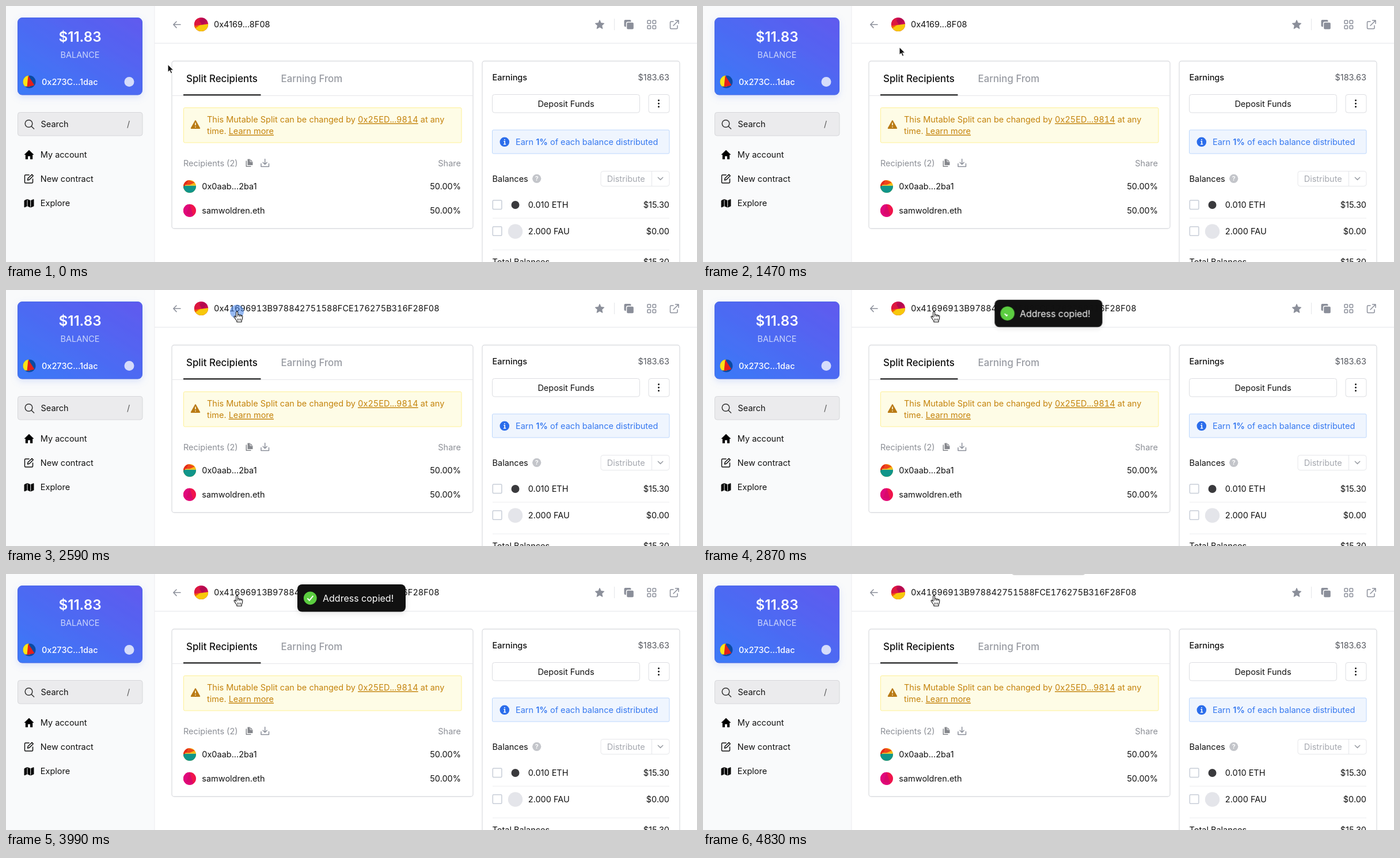
Write an HTML page that moves like this. It is 1200 px wide and 444 px high and loops after 4.9 s.

```html
<!DOCTYPE html>
<html lang="en">
<head>
<meta charset="utf-8">
<title>Split overview</title>
<style>
  :root { --t: 0ms; }
  html, body { margin: 0; width: 100%; height: 100%; overflow: hidden; background: #fff; }
  svg { display: block; width: 100%; height: 100%; }
  text { font: 400 14.5px Inter, Roboto, sans-serif; fill: #111; }
  .mid { text-anchor: middle; }
  .end { text-anchor: end; }
  .medium { font-weight: 500; }
  .bold { font-weight: 600; }
  .white { fill: #fff; }
  .muted { fill: #8c8f96; }
  .tab { font-size: 16.85px; font-weight: 500; }
  .amber { fill: #c4830c; }
  .blue { fill: #3578f0; }
  .hash { font-variant-numeric: tabular-nums; }
  .link { text-decoration: underline; text-underline-offset: 2px; }
  .box { fill: #fff; stroke: #dcdde1; }
  .rule { stroke: #e5e6ea; }
  .line { fill: none; stroke-width: 1.5; stroke-linecap: round; stroke-linejoin: round; }
  .icon { fill: #8b8f9a; }
  .icon-line { stroke: #8b8f9a; }

  /* Each animation is paused and scrubbed by the clock in --t. */
  .cursor {
    transform: translate(281px, 101px);
    animation: approach 560ms ease-in-out calc(1190ms - var(--t)) both paused,
               settle 140ms ease-out calc(2100ms - var(--t)) forwards paused;
  }
  .idle { animation: hide 1ms step-end calc(1650ms - var(--t)) both paused; }
  .hover { animation: show 1ms step-end calc(1650ms - var(--t)) both paused; }
  .press {
    animation: show 1ms step-end calc(2500ms - var(--t)) both paused,
               hide 1ms step-end calc(2640ms - var(--t)) forwards paused;
  }
  .toast, .badge { transform-box: fill-box; transform-origin: center; }
  .toast {
    filter: drop-shadow(0 3px 5px rgba(0, 0, 0, .1));
    animation: enter 350ms cubic-bezier(.21, 1.02, .73, 1) calc(2604ms - var(--t)) both paused,
               leave 400ms cubic-bezier(.06, .71, .55, 1) calc(4678ms - var(--t)) forwards paused;
  }
  .toast text { font-size: 16px; fill: #fff; }
  .badge { animation: pop 300ms cubic-bezier(.175, .885, .32, 1.275) calc(2704ms - var(--t)) both paused; }
  .check {
    stroke-dasharray: 100 110;
    animation: draw 200ms ease-out calc(2804ms - var(--t)) both paused;
  }

  @keyframes approach {
    from { transform: translate(281px, 101px); }
    to { transform: translate(401px, 41px); }
  }
  @keyframes settle {
    from { transform: translate(401px, 41px); }
    to { transform: translate(401.5px, 37.5px); }
  }
  @keyframes show { from { opacity: 0; } to { opacity: 1; } }
  @keyframes hide { from { opacity: 1; } to { opacity: 0; } }
  @keyframes enter {
    from { transform: translateY(-200%) scale(.6); opacity: .5; }
    to { transform: none; opacity: 1; }
  }
  @keyframes leave {
    from { transform: translateY(0) scale(1); opacity: 1; }
    to { transform: translateY(-150%) scale(.6); opacity: 0; }
  }
  @keyframes pop { from { transform: scale(0); } to { transform: scale(1); } }
  @keyframes draw { from { stroke-dashoffset: 101; } to { stroke-dashoffset: 0; } }
</style>
</head>
<body>
<svg viewBox="0 0 1200 444">
  <defs>
    <linearGradient id="card" x1="0" y1="1" x2="1" y2="0">
      <stop offset="0" stop-color="#3a7af7"/>
      <stop offset="1" stop-color="#6059ee"/>
    </linearGradient>
    <filter id="glow" x="-20%" y="-20%" width="140%" height="150%">
      <feDropShadow dx="0" dy="4" stdDeviation="6" flood-color="#7d9cf5" flood-opacity=".25"/>
    </filter>
    <clipPath id="disc"><circle r="11"/></clipPath>
  </defs>

  <!-- Sidebar -->
  <path d="M0 0H258V444H0z" fill="#f9fafb"/>
  <path d="M258 0V444" stroke="#ededf0"/>
  <rect x="20.5" y="20.5" width="216" height="133.5" rx="7.5" fill="url(#card)" stroke="#4766e6" filter="url(#glow)"/>
  <text class="mid bold white" x="128.5" y="62" style="font-size:24.2px">$11.83</text>
  <text class="mid" x="128.5" y="89.7" style="fill:#cbd5fb">BALANCE</text>
  <g transform="translate(40.5 131.5)" clip-path="url(#disc)">
    <path d="M-12-12H12V12H-12z" fill="#0b4aa2"/>
    <path d="M-12-12H-1L1 8L-12 8z" fill="#fbe417"/>
    <path d="M-2-11L9 6L-4 9z" fill="#e3201b"/>
  </g>
  <text class="medium white" x="62" y="136.8">0x273C...1dac</text>
  <circle cx="214" cy="131.5" r="8.5" fill="#d5dcfb"/>

  <rect x="20.5" y="184.5" width="216.5" height="40.5" rx="4" fill="#ebebed" stroke="#d6d7da"/>
  <g class="line" stroke="#333"><circle cx="39.5" cy="204" r="6.3"/><path d="M44.2 208.7L48.6 213"/></g>
  <text x="60.5" y="210.4">Search</text>
  <text x="210" y="210.4" style="fill:#555">/</text>

  <path d="M40 249.8L48.5 258H46.2V265.8H42V260.5H38V265.8H33.8V258H31.5z"/>
  <g class="line" stroke="#111">
    <path d="M40 293H34Q32.5 293 32.5 294.5V305.5Q32.5 307 34 307H45Q46.5 307 46.5 305.5V300"/>
    <path d="M37.5 302L38.2 298.8L45 292.2L47.3 294.5L40.6 301.3z"/>
  </g>
  <path d="M32 337.5L36.5 335.5V347L32 349zM37.5 335.5L42.2 337.5V349L37.5 347zM43.2 337.5L48 335.5V347L43.2 349z" stroke="#111" stroke-linejoin="round"/>
  <path d="M37 336.5V347M42.7 337.5V348" stroke="#f9fafb" stroke-width=".9"/>
  <text x="59.8" y="263.3">My account</text>
  <text x="59.8" y="305.2">New contract</text>
  <text x="59.8" y="347.3">Explore</text>

  <!-- Header -->
  <path class="rule" d="M258 64.5H1200"/>
  <path class="line icon-line" d="M303 32.3H291M296 27L290.8 32.3L296 37.6"/>
  <g transform="translate(339 32) scale(1.1)" clip-path="url(#disc)">
    <path d="M-12-12H12V12H-12z" fill="#c90a52"/>
    <path d="M-12-12H-4L1 2L-12 4z" fill="#dd173f"/>
    <path d="M-3-6L4-11L9-6L2 1z" fill="#b5094f"/>
    <path d="M-12 2.5L12-1V12H-12z" fill="#f7c80b"/>
    <path d="M-12 2.5L-2 1L-9 6z" fill="#f4570c"/>
  </g>
  <text class="idle" x="361" y="37.3">0x4169...8F08</text>
  <text class="hover hash" x="361" y="37.3">0x41696913B978842751588FCE176275B316F28F08</text>

  <path class="icon" stroke="#8b8f9a" stroke-linejoin="round" d="M1031 24.5L1033.3 29.6L1038.8 30.2L1034.7 33.9L1035.9 39.4L1031 36.6L1026.1 39.4L1027.3 33.9L1023.2 30.2L1028.7 29.6z"/>
  <path class="rule" d="M1056.5 22V42"/>
  <rect class="icon" x="1073.5" y="24" width="12" height="12" rx="2"/>
  <rect class="icon" x="1077.5" y="28" width="13" height="13" rx="2.5" stroke="#fff" stroke-width="1.4"/>
  <g class="line icon-line">
    <rect x="1114" y="25" width="5.5" height="5.5" rx="1"/>
    <rect x="1123" y="25" width="5.5" height="5.5" rx="1"/>
    <rect x="1114" y="34" width="5.5" height="5.5" rx="1"/>
    <rect x="1123" y="34" width="5.5" height="5.5" rx="1"/>
    <path d="M1159 27H1155Q1153.5 27 1153.5 28.5V38Q1153.5 39.5 1155 39.5H1164.5Q1166 39.5 1166 38V34M1162.5 25H1168V30.5M1168 25L1159 34"/>
  </g>

  <!-- Split -->
  <rect class="box" x="288" y="95.5" width="523" height="290.5" rx="4" stroke-width="1.3"/>
  <text class="tab" x="313" y="132">Split Recipients</text>
  <text class="tab" x="477.5" y="132" style="fill:#989ba2">Earning From</text>
  <path class="rule" d="M288.5 155.5H810.5"/>
  <path d="M308 154.2H442.5" stroke="#111" stroke-width="2"/>

  <rect x="308.5" y="176.5" width="482.5" height="60.5" rx="2" fill="#fefce6" stroke="#fdf095"/>
  <path d="M329 199L336.3 212H321.7z" fill="#b97a14" stroke="#b97a14" stroke-width="1.8" stroke-linejoin="round"/>
  <path d="M329 202.5V207M329 209V210.6" stroke="#fefce6" stroke-width="1.6"/>
  <text class="amber" x="349" y="202.3">This Mutable Split can be changed by <tspan class="link hash">0x25ED...9814</tspan> at any</text>
  <text class="amber" x="349" y="222.2">time. <tspan class="link">Learn more</tspan></text>

  <text class="muted" x="308" y="277.6">Recipients (2)</text>
  <path d="M419.5 265.5H424L428.5 270V276H419.5z" fill="#85878c"/>
  <path d="M424 265.5V270H428.5" fill="none" stroke="#fff" stroke-width=".9"/>
  <path class="line" d="M417.3 269V278.3H425" stroke="#85878c"/>
  <path class="line icon-line" d="M449.7 265.5V274.5M446.2 271.2L449.7 274.7L453.2 271.2M443 273.5V278.5H456.5V273.5"/>
  <text class="end muted" x="790" y="277.6">Share</text>

  <g transform="translate(319 313)" clip-path="url(#disc)">
    <path d="M-12-12H12V12H-12z" fill="#f5b50f"/>
    <path d="M-12-12H-1L-8 3H-12z" fill="#e52a1c"/>
    <path d="M-1-11L9-7L-8 1z" fill="#ee461b"/>
    <path d="M-12 0L-6-2H12V12H-12z" fill="#10958a"/>
    <path d="M-8-2H11" stroke="#f8cf32" stroke-width="1.5"/>
  </g>
  <text x="340.3" y="318.3">0x0aab...2ba1</text>
  <text class="end" x="790" y="318.3">50.00%</text>
  <g transform="translate(319 354.7)" clip-path="url(#disc)">
    <path d="M-12-12H12V12H-12z" fill="#f0144c"/>
    <path d="M-12-12H0L6 12H-12z" fill="#e0087c"/>
    <path d="M0-11L6 8L-6 6z" fill="#d9096a"/>
  </g>
  <text x="340.3" y="360.1">samwoldren.eth</text>
  <text class="end" x="790" y="360.1">50.00%</text>

  <!-- Earnings -->
  <rect class="box" x="827" y="95.5" width="343" height="370" rx="4" stroke-width="1.3"/>
  <text class="medium" x="844.5" y="128.8">Earnings</text>
  <text class="end" x="1152" y="128.8" style="fill:#55585f">$183.63</text>
  <rect class="box" x="844.5" y="153.5" width="256" height="31.5" rx="4"/>
  <text class="mid" x="972.5" y="174.5">Deposit Funds</text>
  <rect class="box" x="1116" y="153.5" width="36" height="31.5" rx="4"/>
  <path d="M1133.5 163.7v0M1133.5 169.2v0M1133.5 174.7v0" stroke="#111" stroke-width="2.9" stroke-linecap="round"/>

  <rect x="844.5" y="215" width="307.5" height="41" rx="2" fill="#eff5fe" stroke="#bdd7fc"/>
  <circle cx="865.8" cy="235.8" r="8.3" fill="#2b6deb"/>
  <path d="M864.3 234.8H866.2V239.5M864 239.8H868.2M865.9 231v1.8" fill="none" stroke="#fff" stroke-width="1.6"/>
  <text class="blue" x="885" y="241.1">Earn <tspan class="bold">1%</tspan> of each balance distributed</text>

  <text x="844.5" y="304.6">Balances</text>
  <circle cx="921.7" cy="299.3" r="7.6" fill="#c3c5ca"/>
  <text class="mid bold white" x="921.7" y="303.3" style="font-size:11px">?</text>
  <rect class="box" x="1033" y="286.5" width="119" height="26" rx="4" style="stroke:#e6e7ea"/>
  <path class="rule" d="M1121.5 287V312"/>
  <text class="mid" x="1076.7" y="304.6" style="fill:#a5a8af">Distribute</text>
  <path class="line" d="M1132.3 297.2L1136.5 301.4L1140.7 297.2" stroke="#9a9da4"/>

  <g fill="#fff" stroke="#c8ced8" stroke-width="1.5">
    <rect x="845.3" y="337" width="15.6" height="15.6" rx="1.5"/>
    <rect x="845.3" y="382.7" width="15.6" height="15.6" rx="1.5"/>
  </g>
  <circle cx="884.5" cy="345" r="7" fill="#3a3a3d"/>
  <text x="906.8" y="350.3">0.010 ETH</text>
  <text class="end" x="1152" y="350.3">$15.30</text>
  <path d="M845 368H1152M845 423H1152" stroke="#ebecef"/>
  <circle cx="884.5" cy="391" r="12.7" fill="#e4e5ea"/>
  <text x="906.8" y="396.1">2.000 FAU</text>
  <text class="end" x="1152" y="396.1">$0.00</text>
  <text x="844.5" y="448.6">Total Balances</text>
  <text class="end" x="1152" y="448.6">$15.30</text>

  <!-- Toast -->
  <g class="toast">
    <rect x="506" y="18" width="188" height="47.5" rx="8" fill="#111"/>
    <circle class="badge" cx="528.3" cy="41.8" r="11.4" fill="#5bcd40"/>
    <path class="check" pathLength="100" d="M523.4 42.2L526.9 45.8L533.4 37.8" fill="none" stroke="#fff" stroke-width="2"/>
    <text x="550" y="47.6">Address copied!</text>
  </g>

  <!-- Pointer -->
  <circle class="press" cx="401" cy="37.5" r="12" fill="#3f7fe8" fill-opacity=".55"/>
  <g class="cursor">
    <path class="idle" d="M0 0V14.2L3.2 11.2L5.4 16.3L7.9 15.2L5.7 10.3H10.2z" fill="#111" stroke="#fff" stroke-width="1.1"/>
    <g class="hover" fill="#fff" stroke="#111" stroke-width="1.1" stroke-linejoin="round">
      <path d="M-1.9 1.4C-1.9-.6 1.1-.6 1.1 1.4V6.2C1.3 4.9 4 5 4 6.4C4.6 5.4 6.7 5.7 6.7 7.1C7.4 6.3 9.3 6.7 9.3 8.2C9.3 12 8.8 14 7.6 15.4V18H-.6V16C-2 14.5-4.3 10.9-5.3 9.4C-5.8 8-4.2 7.2-3 8.5L-1.9 9.8z"/>
      <path d="M1.1 6V9M4 6.4V9.2M6.7 7V9.4M1 12V15.5M3.5 12V15.5M6 12V15.5" fill="none" stroke-width=".9"/>
    </g>
  </g>
</svg>
<script>
  const LOOP = 4900, STEP = 70;
  const root = document.documentElement;
  const start = performance.now();

  function tick() {
    const time = (performance.now() - start) % LOOP;
    root.style.setProperty('--t', Math.floor(time / STEP) * STEP + 'ms');
    requestAnimationFrame(tick);
  }
  tick();
</script>
</body>
</html>
```
